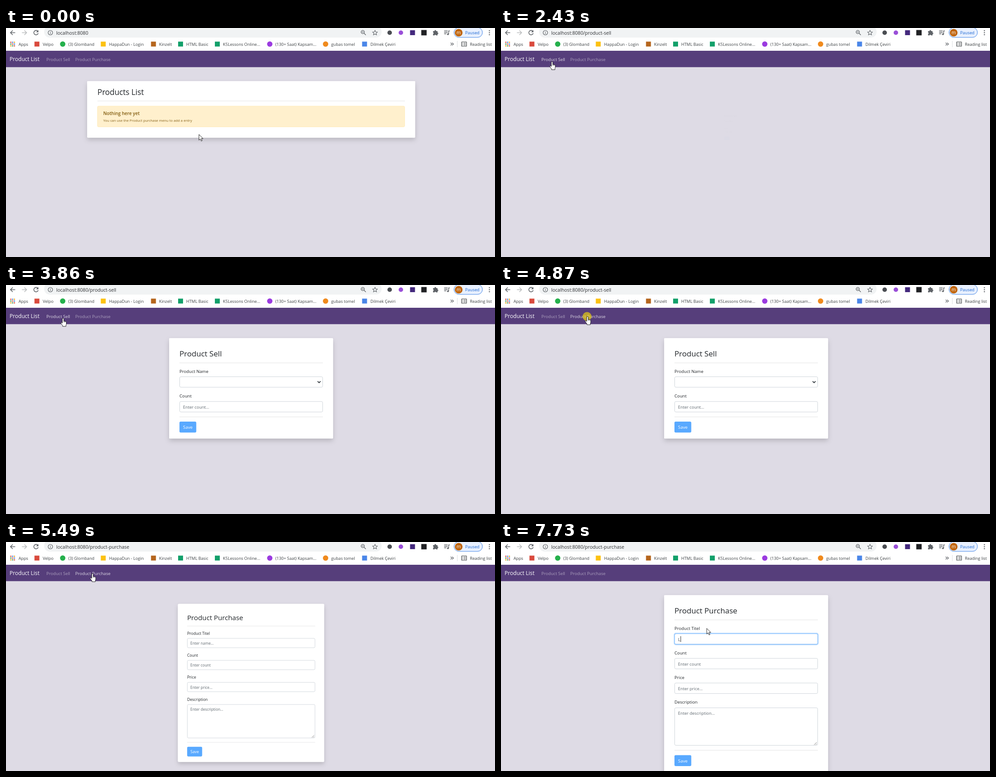
These frames come from a looping animation (1091x513 px, 8000 ms). An HTML page:

```html
<!DOCTYPE html>
<html lang="en">
<head>
<meta charset="utf-8">
<title>Product app</title>
<style>
html, body { margin: 0; width: 100%; height: 100%; overflow: hidden; background: #dedbe5; }
svg { display: block; width: 100%; height: 100%; }
text { font-family: "Open Sans", "Noto Sans", sans-serif; white-space: pre; }
</style>
</head>
<body>
<svg id="stage" viewBox="0 0 1091 513" xmlns="http://www.w3.org/2000/svg"></svg>
<script>
const LOOP = 8000;
const INK = '#212529', GREY = '#5f6368', UI = '#3c4043';

// --- drawing helpers -------------------------------------------------
const text = (x, y, s, size, fill = INK, attrs = '') =>
  `<text x="${x}" y="${y}" font-size="${size}" fill="${fill}" ${attrs}>${s}</text>`;
const rect = (x, y, w, h, fill, attrs = '') =>
  `<rect x="${x}" y="${y}" width="${w}" height="${h}" fill="${fill}" ${attrs}/>`;
const dot = (x, y, r, fill, attrs = '') =>
  `<circle cx="${x}" cy="${y}" r="${r}" fill="${fill}" ${attrs}/>`;
const line = (d, stroke, width = 1.4, attrs = '') =>
  `<path d="${d}" fill="none" stroke="${stroke}" stroke-width="${width}" ${attrs}/>`;

// --- browser bars ----------------------------------------------------
function toolbar() {
  const back = line('M20.5 10.5H10.5M15 5.5l-5 5 5 5', GREY, 1.6);
  const forward = line('M35.5 10.5H45.5M41 5.5l5 5-5 5', '#babcbe', 1.6);
  const reload = line('M71 7.2A5 5 0 1 0 71.9 11.8', GREY, 1.6) +
    `<path d="M72.3 4.6v5h-5z" fill="${GREY}"/>`;
  const info = dot(99, 10.5, 5, 'none', `stroke="${GREY}" stroke-width="1.2"`) +
    line('M99 9.8v3.4M99 7.4v1.3', GREY, 1.2);
  const zoom = dot(796, 9, 3.7, 'none', `stroke="${GREY}" stroke-width="1.3"`) +
    line('M798.8 11.8l4 4M794.2 9h3.6', GREY, 1.3);
  const star = line('M823.3 5.2l1.6 3.5 3.8.4-2.8 2.6.8 3.8-3.4-2-3.4 2 .8-3.8-2.8-2.6 3.8-.4z', GREY, 1.1);
  const marks = dot(856, 10.5, 5, '#4a4d52') + dot(881, 10.5, 5, '#9a4fd8') +
    rect(901.5, 5, 11, 11, '#44297d') + rect(926.5, 4.5, 12, 12, '#202124');
  const puzzle = `<path fill="${GREY}" d="M952.8 7h3.3a1.8 1.8 0 1 1 3.5 0h3.2v3.2a1.8 1.8 0 1 1 0 3.6V16.4h-3.3a1.8 1.8 0 0 0-3.4 0h-3.3v-3.2a1.7 1.7 0 0 0 0-3.3z"/>`;
  const queue = line('M977.5 6.5h8M977.5 9.8h8M977.5 13h5M987.6 14V6.5h2.6', GREY, 1.4) +
    dot(986, 14, 1.9, GREY);
  const account = rect(999.5, -1, 63.5, 22, '#e8f0fe', 'rx="11" stroke="#3f83e6"') +
    dot(1010, 10.5, 8.6, '#c0660f') +
    text(1010, 14, 'm', 10, '#fff', 'text-anchor="middle"') +
    text(1024.5, 14, 'Paused', 9.3, '#1a66d2');
  const menu = [6, 10.5, 15].map(y => dot(1078.5, y, 1.3, GREY)).join('');
  return rect(0, 0, 1091, 51, '#fff') + rect(85, -4, 753, 25.5, '#f1f3f4', 'rx="12.7"') +
    back + forward + reload + info + zoom + star + marks + puzzle + queue + account + menu;
}

function bookmarks() {
  const square = (x, c) => rect(x - 5.5, 30.5, 11, 11, c);
  const disc = (x, c) => dot(x, 36, 6, c);
  const items = [
    [69, square, '#d94a3d', 82, 'Velpo'],
    [126.5, disc, '#25b04c', 139, '(3) Glomband'],
    [217, square, '#fcc112', 230, 'HappaDun - Login'],
    [329, square, '#b5651d', 341.5, 'Kinzelt'],
    [389.5, square, '#13a06a', 402, 'HTML Basic'],
    [471.5, square, '#13a06a', 484, 'K5Lessons Online...'],
    [588.5, disc, '#9b3be0', 601, '(130+ Saat) Kapsam...'],
    [713, disc, '#f08a1d', 725.5, 'gubas tomel'],
    [800, square, '#4a86e8', 813, 'Dilmek Çeviri'],
  ];
  const colors = ['#d94a3d', '#3c9a55', '#e3a51a', '#3f7de0'];
  let out = '';
  for (let i = 0; i < 9; i++)
    out += rect(9.5 + (i % 3) * 4, 30.7 + Math.floor(i / 3) * 4, 2.6, 2.6, colors[(i * 3) % 4]);
  out += text(28, 39.5, 'Apps', 9.2, UI);
  for (const [x, mark, color, tx, label] of items) out += mark(x, color) + text(tx, 39.5, label, 9.2, UI);
  out += line('M992 33l3 3-3 3M995.5 33l3 3-3 3', GREY, 1.2) + rect(1006.5, 29, 1, 14, '#dadce0');
  out += rect(1016.5, 31, 11, 10, 'none', `rx="1" stroke="${UI}" stroke-width="1.2"`) +
    line('M1018.5 33.5h1.5M1018.5 36h1.5M1018.5 38.5h1.5M1021.5 33.5h4M1021.5 36h4M1021.5 38.5h4', UI, 1);
  return out + text(1035, 39.5, 'Reading list', 9.15, UI);
}

function navbar() {
  return rect(0, 51, 1091, 36.7, '#563e7b') + text(8, 74, 'Product List', 12.1, '#fff') +
    text(90, 74, 'Product Sell', 9.6, '#fff', 'id="navSell"') +
    text(154.5, 74, 'Product Purchase', 9.6, '#fff', 'id="navBuy"');
}

// --- page cards ------------------------------------------------------
const card = (x, y, w, h) => rect(x, y, w, h, '#fff', 'rx="2" filter="url(#shadow)"') +
  rect(x, y, w, h, '#fff', 'rx="2"');
const rule = (x, y, w) => rect(x, y, w, 1, '#e3e3e4');
const title = (x, y, s) => text(x, y, s, 17.1, INK, 'font-weight="500"');
const hint = (y, s, attrs = '') => text(395, y, s, 9.4, '#5f686f', attrs);
const box = (y, h) => rect(387.5, y + .5, 319, h, '#fff', 'rx="2.7" stroke="#ced4da"');
const label = (i, s) => text(387, 197 + 55 * i, s, 9.65);
const save = y => rect(387, y, 37.5, 24.5, '#59a9ff', 'rx="2.7"') +
  text(405.7, y + 16, 'Save', 9.8, '#fff', 'text-anchor="middle"');

function listCard() {
  return card(181, 119, 732, 126.5) + text(204, 149.5, 'Products List', 17.3, INK, 'font-weight="500"') +
    rule(204, 163, 686) +
    rect(204, 175, 685.5, 46.5, '#fff0cd', 'rx="2.7" stroke="#ffebba"') +
    text(217, 194.5, 'Nothing here yet', 10, '#7f5a0c', 'font-weight="600"') +
    text(217, 210, 'You can use the Product purchase menu to add a entry', 7.76, '#856018');
}

function sellCard() {
  return card(364, 119, 365.5, 225) + title(387, 160, 'Product Sell') + rule(387, 174, 320) +
    label(0, 'Product Name') + box(205, 23.5) + line('M695.2 215.6l3.3 3.3 3.3-3.3', '#343a40', 1.8) +
    label(1, 'Count') + box(260.5, 23.5) + hint(276.5, 'Enter count...') +
    rule(387, 295, 320) + save(306);
}

function buyCard() {
  const fields = [['Product Titel', 'Enter name...'], ['Count', 'Enter count'], ['Price', 'Enter price...']];
  let out = card(364, 119, 365.5, 396.5) + title(387, 160, 'Product Purchase') + rule(387, 174, 320);
  fields.forEach(([name, ph], i) => {
    out += label(i, name) + box(205 + 55.2 * i, 23.5) + hint(221.5 + 55.2 * i, ph, i ? '' : 'id="nameHint"');
  });
  return out + label(3, 'Description') + box(371, 84) + hint(387, 'Enter description...') +
    line('M698.5 454.5l6-6M702 454.5l2.5-2.5', '#777', .9) + rule(387, 466, 320) + save(477.5) +
    `<g id="focus">${rect(386.5, 204.5, 321, 25.5, 'none', 'rx="3.5" stroke="#007bff" stroke-opacity=".25" stroke-width="2.4"')}
     ${rect(387.5, 205.5, 319, 23.5, 'none', 'rx="2.7" stroke="#80bdff"')}</g>` +
    text(395, 221.5, 'L', 9.6, '#495057', 'id="typed"') + rect(395, 211, 1, 13, '#222', 'id="caret"');
}

const pointers = {
  arrow: '<path d="M.5.5V13.2l3-2.8 2.1 4.8 2.1-.9-2-4.6h4z" fill="#fff" stroke="#111" stroke-width=".9"/>',
  hand: '<path d="M-1.7 1.3a1.6 1.6 0 0 1 3.2 0V6l1.8.4 2.2.6q1.6.5 1.6 2.2v3.2q0 1.5-.8 2.8V18H-1.2V16L-4.6 11.6q-1-1.6 0-2.3t2.9 1.3z" fill="#fff" stroke="#111" stroke-width=".9"/>' +
    line('M1.5 6v3M3.9 6.6v2.6', '#111', .7),
  beam: line('M-3-6.5h2q1 0 1 1q0-1 1-1h2M0-5.5v11M-3 6.5h2q1 0 1-1q0 1 1 1h2', '#111', 1),
};

const stage = document.getElementById('stage');
stage.innerHTML = `<defs><filter id="shadow" x="-10%" y="-20%" width="120%" height="150%">
  <feDropShadow dx="0" dy="5.3" stdDeviation="5.3" flood-color="#000" flood-opacity=".17"/></filter></defs>` +
  rect(0, 0, 1091, 513, '#dedbe5') +
  `<g id="list">${listCard()}</g><g id="sell">${sellCard()}</g><g id="buy">${buyCard()}</g>` +
  navbar() + toolbar() + bookmarks() + text(112, 14.5, '', 10.6, '#303235', 'id="url"') +
  dot(0, 0, 10, '#ffe600', 'id="click" fill-opacity=".6"') + '<g id="pointer"></g>';
const $ = id => document.getElementById(id);
const show = (id, on) => $(id).setAttribute('display', on ? 'inline' : 'none');

// --- timing ----------------------------------------------------------
// The screen refreshes in bursts: [first, last, count]
const bursts = [[70, 70, 1], [330, 1130, 13], [1200, 1550, 6], [1840, 2100, 5], [2300, 2430, 3],
  [2500, 2910, 6], [3050, 3460, 7], [3860, 4200, 6], [4870, 5610, 12], [5680, 6030, 6],
  [6240, 6300, 2], [6560, 6760, 4], [7100, 7100, 1], [7610, 7730, 2]];

function lastRefresh(t) {
  let at = 0;
  for (const [a, b, n] of bursts) {
    if (t < a) break;
    const step = n > 1 ? (b - a) / (n - 1) : 1;
    at = a + Math.min(n - 1, Math.floor((t - a) / step + 1e-6)) * step;
  }
  return at;
}

// Pointer hotspot: [time, x, y]
const path = [[0, 430, 238], [69, 430, 238], [70, 495, 152], [265, 495, 152], [400, 572, 166],
  [530, 566, 198], [665, 440, 204], [860, 240, 180], [1000, 90, 140], [1130, 8, 124],
  [1270, 1, 100], [1340, 6, 84], [1480, 45, 66], [1550, 65, 60.5], [1775, 65, 60.5],
  [2100, 114, 75.5], [3790, 114, 75.5], [4200, 193, 71], [5500, 193, 71], [5610, 248, 102],
  [5820, 420, 170], [6030, 492, 228], [6180, 492, 228], [6300, 491.5, 221.5],
  [6570, 491.5, 221.5], [6760, 458.5, 193]];

function pointerAt(t) {
  const i = path.findIndex(p => p[0] > t);
  if (i < 0) return path[path.length - 1].slice(1);
  const [t0, x0, y0] = path[i - 1], [t1, x1, y1] = path[i];
  const k = (t - t0) / (t1 - t0);
  return [x0 + (x1 - x0) * k, y0 + (y1 - y0) * k];
}

// CSS "ease": cubic-bezier(.25, .1, .25, 1)
function ease(p) {
  if (p <= 0) return 0;
  if (p >= 1) return 1;
  const curve = (s, a, b) => 3 * (1 - s) ** 2 * s * a + 3 * (1 - s) * s * s * b + s ** 3;
  let lo = 0, hi = 1;
  for (let i = 0; i < 24; i++) {
    const mid = (lo + hi) / 2;
    if (curve(mid, .25, .25) < p) lo = mid; else hi = mid;
  }
  return curve(lo, .1, 1);
}

function zoomIn(id, p, cy) {
  const s = .3 + .7 * ease(p);
  $(id).setAttribute('transform', `translate(546.7 ${cy}) scale(${s}) translate(-546.7 ${-cy})`);
  $(id).setAttribute('opacity', ease(p * 2));
}

const between = (t, a, b) => t >= a && t < b;
let kind = '';

function render(time) {
  const t = lastRefresh(time);
  const view = t < 2420 ? 'list' : t < 4930 ? 'sell' : 'buy';
  for (const id of ['list', 'sell', 'buy']) show(id, id === view);
  zoomIn('sell', (t - 2415) / 1000, 216);
  zoomIn('buy', (t - 4927) / 1000, 302);
  $('url').textContent = 'localhost:8080' + { list: '', sell: '/product-sell', buy: '/product-purchase' }[view];

  $('navSell').setAttribute('fill-opacity', between(t, 1960, 4870) ? .8 : .5);
  $('navBuy').setAttribute('fill-opacity', between(t, 4090, 6560) ? .8 : .5);

  const typed = t >= 7729;
  $('focus').setAttribute('opacity', Math.max(0, Math.min(1, (t - 6520) / 150)));
  show('nameHint', !typed);
  show('typed', typed);
  show('caret', between(t, 6560, 7100) || t >= 7610);
  $('caret').setAttribute('x', typed ? 400.5 : 395);

  const [x, y] = pointerAt(t);
  const next = between(t, 1475, 5590) ? 'hand' : between(t, 5950, 6690) ? 'beam' : 'arrow';
  if (next !== kind) $('pointer').innerHTML = pointers[kind = next];
  $('pointer').setAttribute('transform', `translate(${x} ${y})`);
  show('click', between(t, 2300, 2430) || between(t, 4870, 4930) || between(t, 6560, 6620));
  $('click').setAttribute('cx', x - 1);
  $('click').setAttribute('cy', y - .5);
}

const start = performance.now();
function tick() {
  render((performance.now() - start) % LOOP);
  requestAnimationFrame(tick);
}
tick();
</script>
</body>
</html>
```
